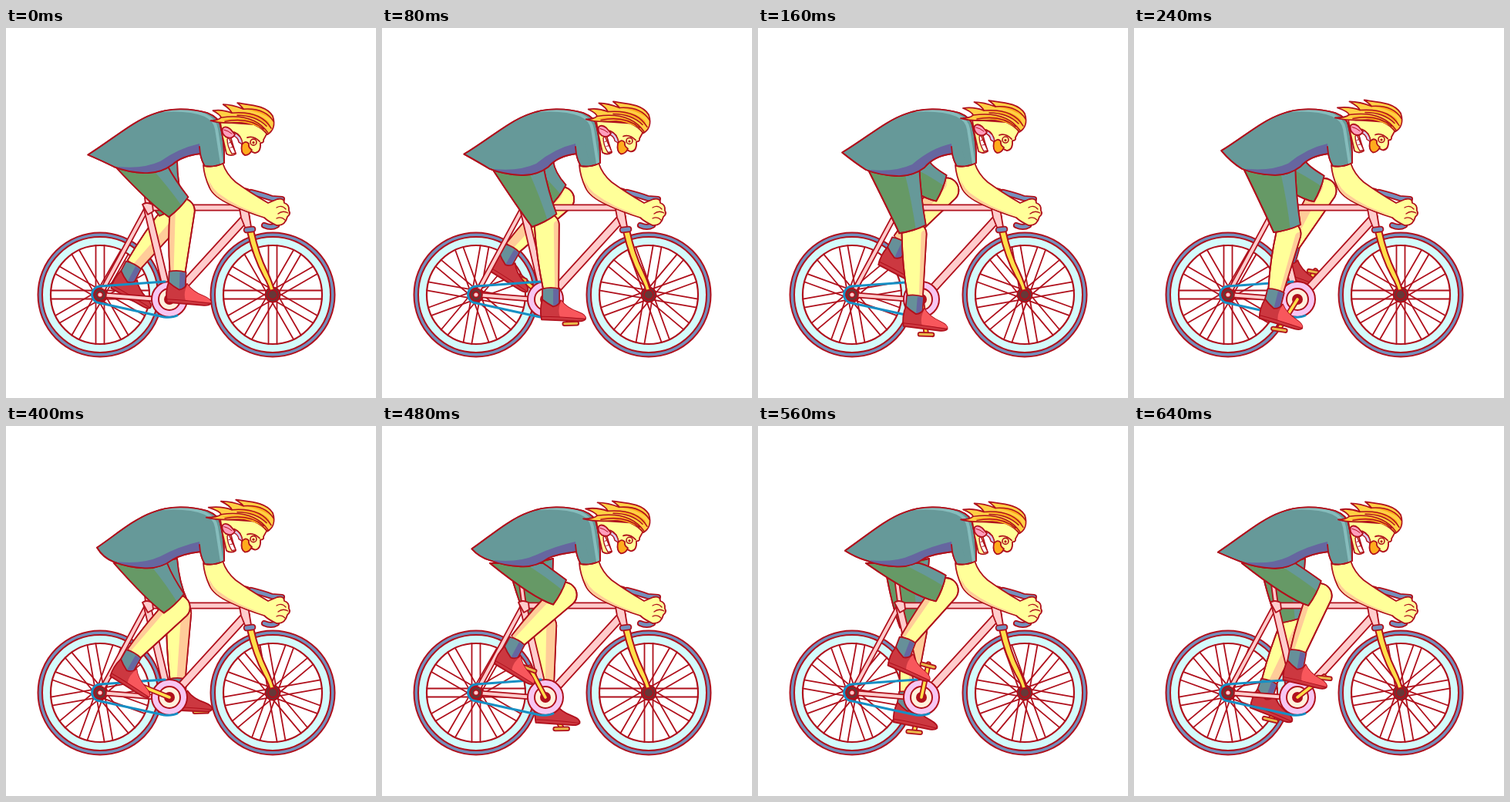
These frames come from a looping animation (480x480 px, 0.72 s). An HTML page with a canvas:

```html
<!DOCTYPE html>
<html lang="en">
<head>
<meta charset="utf-8">
<title>Cyclist</title>
<style>
html, body { margin: 0; width: 100%; height: 100%; overflow: hidden; background: #fff; }
canvas { display: block; width: 480px; height: 480px; }
</style>
</head>
<body>
<canvas id="stage" width="480" height="480"></canvas>
<script>
const ctx = document.getElementById('stage').getContext('2d');
const STEP = 80, COUNT = 9, RAD = Math.PI / 180;
const C = {
  line: '#b0101c', skin: '#ffff99', skinShade: '#ffcc99', shirt: '#669999', light: '#85bcbc',
  shade: '#6666a0', green: '#669966', shoe: '#cc3840', shoeLight: '#f8575c', sock: '#669099',
  bike: '#ffcccc', gold: '#ffdf4a', tyre: '#7390bd', rim: '#d3fbfb', chain: '#168fc4',
  ring: '#f7c6f2', hub: '#663838', hair: '#ffab1c', hairLight: '#ffd044', tongue: '#ff9fbd'
};

// Cosine swing around a middle value, largest when the crank is at peak degrees
const swing = (mid, amp, angle, peak) => mid + amp * Math.cos((angle - peak) * RAD);

function shape(d, fill, width = 1.8, stroke = C.line) {
  const p = new Path2D(d);
  if (fill) { ctx.fillStyle = fill; ctx.fill(p); }
  if (width) { ctx.strokeStyle = stroke; ctx.lineWidth = width; ctx.stroke(p); }
  return p;
}

function disc(x, y, r, fill, width = 1.8) {
  ctx.beginPath();
  ctx.arc(x, y, r, 0, 7);
  if (fill) { ctx.fillStyle = fill; ctx.fill(); }
  if (width) { ctx.strokeStyle = C.line; ctx.lineWidth = width; ctx.stroke(); }
}

// Outlined tube along a path
function tube(d, fill, w) {
  shape(d, null, w + 3.6);
  shape(d, null, w, fill);
}

function turned(x, y, deg, draw) {
  ctx.save();
  ctx.translate(x, y);
  ctx.rotate(deg * RAD);
  draw();
  ctx.restore();
}

function inside(path, draw) {
  ctx.save();
  ctx.clip(path);
  draw();
  ctx.restore();
}

function wheel(x, k) {
  disc(x, 346, 80.5, C.tyre, 2);
  disc(x, 346, 75, C.rim, 2);
  disc(x, 346, 64, '#fff', 2.2);
  turned(x, 346, k * 10, () => {
    for (let i = 0; i < 12; i++) {
      ctx.rotate(30 * RAD);
      shape('M5 -5.5H64M5 5.5H64', null, 1.8);
    }
  });
  disc(x, 346, 9.5, C.hub, 2);
}

function foot(x, y, deg, far) {
  turned(x, y, deg, () => {
    shape('M-11 0Q0 -3 11 0L11 25H-11Z', C.sock);
    shape('M3 0L10 1V22H3Z', C.shade, 0);
    const shoe = shape('M-11 14Q-5 19 3 23Q10 22 13 15Q20 25 35 30Q46 34 45 39Q43 42 36 42L-12 40Q-15 27 -11 14Z', C.shoe);
    if (!far) inside(shoe, () => shape('M14 14Q8 27 12 37L46 38V14Z', C.shoeLight, 0));
    shape('M-13 36Q10 36 44 39', null, 1);
  });
}

function leg(angle, far) {
  const kx = swing(222, 22, angle, 290) + (far ? 3 : 0);
  const ky = swing(241, 28, angle, 100) - (far ? 4 : 0);
  const ax = swing(194, 29, angle, 12), ay = swing(312, 36, angle, 85);
  const len = Math.hypot(ax - kx, ay - ky);
  const nx = (ky - ay) / len, ny = (ax - kx) / len;
  const knee = r => `${kx + nx * r} ${ky + ny * r}`;
  const ankle = r => `${ax + nx * r} ${ay + ny * r}`;
  const calf = `${(kx + ax) / 2 + nx * 16} ${(ky + ay) / 2 + ny * 16}`;

  // Shin with a rounded knee
  const shin = shape(`M${ankle(10)}Q${calf} ${knee(16)}A16 16 0 0 1 ${knee(-16)}L${ankle(-10)}Z`, C.skin);
  const side = Math.sin((angle - 20) * RAD) > 0 ? -1 : 1;
  inside(shin, () => shape(`M${knee(side * 14)}L${ankle(side * 10)}`, null, far ? 22 : 10, C.skinShade));
  shape(`M${ankle(10)}Q${calf} ${knee(16)}A16 16 0 0 1 ${knee(-16)}L${ankle(-10)}`, null);
  foot(ax, ay, swing(15, 15, angle, 215), far);

  // Shorts from hip to a hem square to the thigh
  const hx = far ? 188 : 178, hy = 188;
  const d = Math.hypot(kx - hx, ky - hy), ux = (kx - hx) / d, uy = (ky - hy) / d;
  const at = (along, out) => `${kx + ux * along + uy * out} ${ky + uy * along - ux * out}`;
  const back = far ? '165 184' : '140 178', front = far ? '222 172' : '209 178';
  const thigh = `M${back}Q${at(-d * 0.5, -23)} ${at(-7, -18)}Q${at(-4, 0)} ${at(-7, 18)}Q${at(-d * 0.5, 22)} ${front}Z`;
  const cloth = shape(thigh, C.green);
  inside(cloth, () => {
    shape(`M${front}L${at(-d, 12)}Q${at(-d * 0.5, 10)} ${at(0, 3)}L${at(0, 30)}Z`, C.shirt, 0);
  });
  shape(thigh, null);
}

function pedal(angle) {
  turned(212, 352, angle, () => {
    tube('M0 0H44', C.gold, 3.6);
    turned(44, 0, swing(10, 12, angle, 215) - angle, () => tube('M-8 2H8', '#e9b94a', 3));
  });
}

function frame() {
  tube('M180 200L185 238', C.bike, 3.5);
  tube('M182 235L122 346', C.bike, 4);
  tube('M122 346L210 353', C.bike, 4);
  tube('M183 233L211 350', C.bike, 7);
  tube('M187 233H310', C.bike, 5.5);
  tube('M311 246L216 350', C.bike, 8.5);
  shape('M177 229Q182 225 190 229L191 238L184 242Z', C.bike);
  shape('M302 229L314 234L318 258L311 261L305 246Z', C.bike);
  shape('M313 264L321 262Q328 294 339 316Q346 331 349 344L344 348Q342 335 334 322Q321 298 313 264Z', C.gold, 2);
  tube('M312 262L320 261', C.tyre, 5);
  disc(346, 346, 6, C.hub);
}

function drivetrain() {
  disc(122, 346, 8, C.hub);
  disc(122, 346, 3.5, C.bike);
  disc(212, 352, 23, C.ring, 2);
  disc(212, 352, 14, '#fff0dc', 2);
  disc(212, 352, 7, C.line, 0);
  shape('M206 329L122 335A11 11 0 0 0 118 356L205 375Q216 376 222 373', null, 3, C.chain);
}

function bars() {
  shape('M302 208Q311 207 320 212', null, 2);
  tube('M318 213Q334 217 345 221L358 222', C.tyre, 4.5);
  tube('M335 256Q344 260 351 256', C.tyre, 4.5);
}

function torso(angle) {
  const tx = swing(112, -6, angle, 20), ty = swing(161, 3.5, angle, 0);
  const lift = swing(5, 5, angle, 260);
  const belly = `Q228 166 216 ${181 - lift}Q200 ${193 - lift} 180 ${192 - lift}Q158 ${191 - lift} 140 ${184 - lift}`;
  const body = `M${tx} ${ty}C140 143 165 121 190 112C212 103 240 104 261 110Q276 116 278 126Q284 150 283 175Q271 181 258 179Q254 173 252 163${belly}Q126 ${175 - lift / 2} ${tx} ${ty}Z`;
  const cloth = shape(body, C.shirt);
  inside(cloth, () => {
    shape(`M146 ${184 - lift}Q178 ${187 - lift} 200 ${177 - lift}Q224 156 251 150L254 200H140Z`, C.shade, 0);
    shape('M253 150L250 185L270 184L264 150Z', C.shirt, 0);
    shape('M205 107Q238 105 258 113Q271 119 273 131L280 176', null, 4, C.light);
  });
  shape(body, null);
  shape('M252 163L251 154', null);
}

function arm() {
  shape('M256 178Q270 182 281 175Q286 190 298 200Q316 213 340 227L352 222Q361 220 361 227Q368 229 367 237Q370 241 365 245Q362 257 351 256Q340 251 335 246Q312 239 291 229Q269 219 264 207Q257 192 256 178Z', C.skin);
  shape('M258 181Q262 203 275 214Q300 233 334 243Q310 238 291 228Q269 218 265 206Z', C.skinShade, 0);
  shape('M351 233Q358 229 363 235M353 241Q359 236 366 240M351 247Q357 244 362 249', null, 1.3);
}

function head(angle) {
  const s = swing(-5.5, 3, angle, 0);
  ctx.save();
  ctx.translate(0, swing(0, -2.5, angle, 120));
  shape('M278 121L322 124L340 133L334 144Q335 148 330 148Q331 160 323 161Q317 159 314 155L306 149Q306 138 296 134L291 139Q294 150 298 162Q292 166 286 162L281 140Z', C.skin);
  shape('M295 134Q306 138 307 150L302 147Q301 140 293 138Z', '#d8c8ee', 1.4);
  shape('M289 141L298 161L293 162Q287 152 287 143Z', '#fff', 1.4);
  shape('M289 148L292 147M291 154L295 153', null, 1);
  shape('M297 137Q293 144 285 140Q279 135 281 129Q285 125 291 130Z', C.tongue);
  shape('M283 131Q288 132 293 136', null, 1);
  shape('M306 150Q311 144 315 149Q314 154 319 157Q316 164 310 164Q304 161 306 150Z', C.hair);
  disc(321, 147, 4, C.skin, 1.6);
  disc(321, 147.5, 1.6, C.line, 0);
  shape('M313 141Q321 138 329 146', null, 1.8);

  shape(`M339 137C346 133 350 125 346 113C338 100 321 99 ${301 + s / 3} 96Q306 101 308 104Q293 98 ${283 + s / 2} 98Q291 104 293 109Q280 104 ${271 + s} 106Q278 111 279 115Q275 119 ${268 + s} 119C285 126 306 118 322 124Q333 129 339 137Z`, C.hairLight);
  shape('M280 118Q315 112 332 126L339 135Q324 120 280 118ZM293 110Q325 105 341 121L343 129Q327 110 293 110ZM308 104Q334 101 346 118Q328 106 308 104Z', C.hair, 0);
  shape('M279 115Q322 109 340 135M293 109Q331 106 344 129M308 104Q336 102 347 120M284 120Q316 114 334 130M300 112Q324 112 338 126', null, 1.5);
  ctx.restore();
}

function draw(k) {
  const angle = k * 360 / COUNT + 2, opposite = angle + 180;
  ctx.clearRect(0, 0, 480, 480);
  wheel(122, k);
  wheel(346, k);
  pedal(opposite);
  leg(opposite, true);
  frame();
  drivetrain();
  pedal(angle);
  leg(angle, false);
  bars();
  arm();
  torso(angle);
  head(angle);
}

ctx.lineJoin = ctx.lineCap = 'round';
const start = performance.now();
let shown = -1;
function tick() {
  const k = Math.floor((performance.now() - start) / STEP) % COUNT;
  if (k !== shown) draw(shown = k);
  requestAnimationFrame(tick);
}
tick();
</script>
</body>
</html>
```
